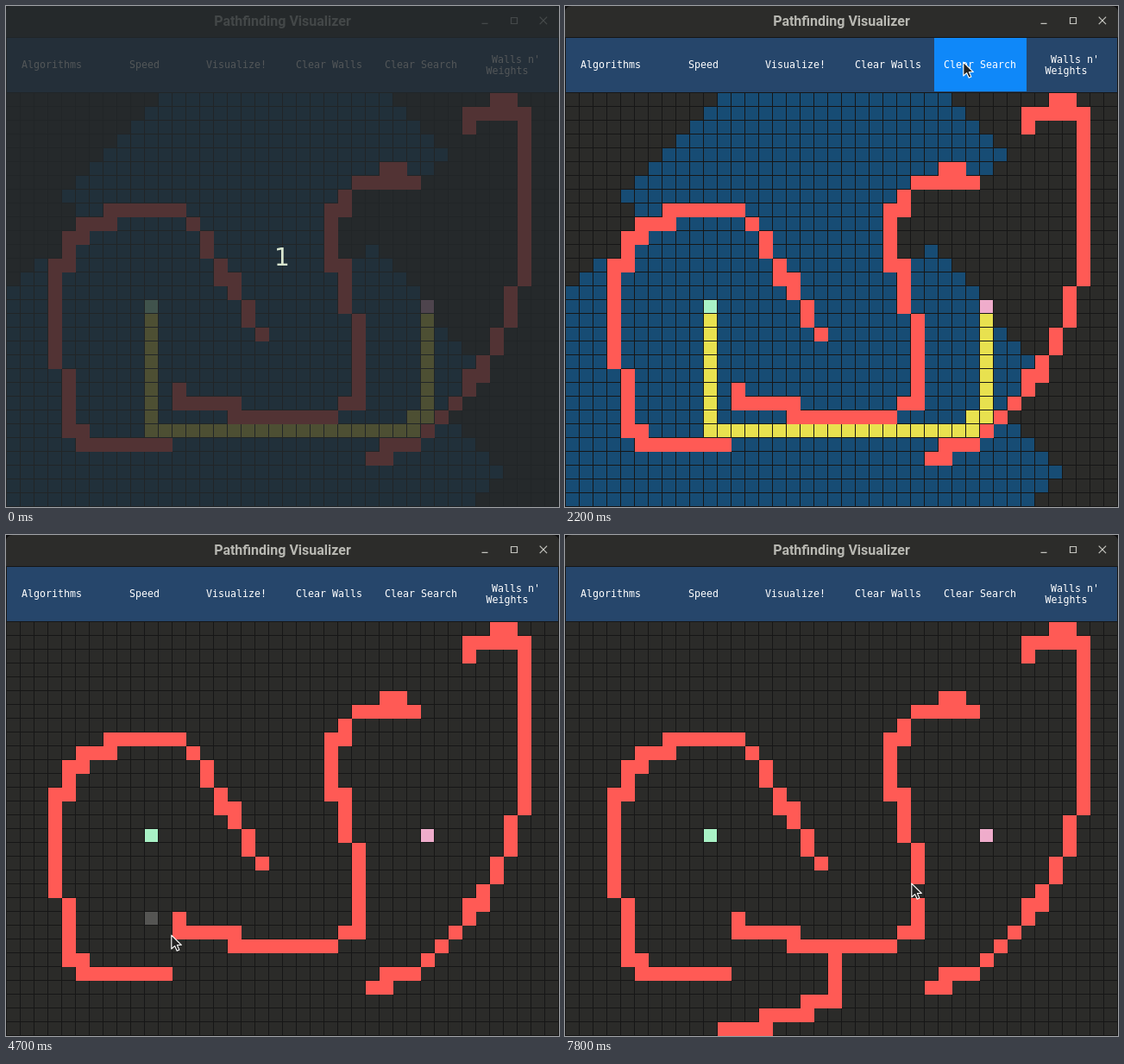
These frames come from a looping animation (641x581 px, 8 s). An HTML page with a canvas:

```html
<!DOCTYPE html>
<html lang="en">
<head>
<meta charset="utf-8">
<title>Pathfinding Visualizer</title>
<style>
  html, body { margin: 0; width: 641px; height: 581px; overflow: hidden; background: #0d0d0d; }
  canvas, svg { position: absolute; left: 0; top: 0; display: block; }
  .title { font: bold 16px Roboto, sans-serif; fill: #b8b8b2; }
  .nav { font: 11.63px "DejaVu Sans Mono", monospace; fill: #fff; }
  .count { font: 28px "DejaVu Sans", sans-serif; fill: #d9e6cf; }
  .icon { fill: none; stroke: #c4c4be; stroke-width: 1.2; }
</style>
</head>
<body>
<canvas id="board" width="641" height="581"></canvas>
<svg width="641" height="581" viewBox="0 0 641 581">
  <path d="M0 36V8Q0 0 8 0H633Q641 0 641 8V36Z" fill="#2c2c2a"/>
  <text class="title" x="320.5" y="23" text-anchor="middle">Pathfinding Visualizer</text>
  <path class="icon" d="M551.5 20.4h7M585.5 13.5h7v7h-7zM618.7 12.7l8.4 8.4m0-8.4l-8.4 8.4"/>
  <g class="nav">
    <text x="18" y="72">Algorithms</text>
    <text x="143" y="72">Speed</text>
    <text x="232" y="72">Visualize!</text>
    <text x="336" y="72">Clear Walls</text>
    <text x="439" y="72">Clear Search</text>
    <text x="563" y="66">Walls n'</text>
    <text x="556.5" y="79">Weights</text>
  </g>
  <path id="cursor" d="M.8 1.2V17L4.6 13.6 7.2 19.3 9.9 18.1 7.4 12.5H12.3Z"
        fill="#242424" stroke="#fff" stroke-width="1.1" stroke-linejoin="round"/>
  <g id="dim">
    <rect width="641" height="581" fill="#24292c" opacity=".79"/>
    <text class="count" x="320" y="301" text-anchor="middle">1</text>
  </g>
</svg>
<script>
const LOOP = 8000, STEP = 100, CELL = 16, TOP = 100, COLS = 40, ROWS = 30;
const ctx = document.getElementById('board').getContext('2d');
const cursor = document.getElementById('cursor');
const dim = document.getElementById('dim');

const color = {
  line: '#161616', empty: '#2b2b29', seen: '#174c74', path: '#e8e14f', wall: '#ff5a55',
  start: '#a9f2c6', end: '#efaccb', hover: '#555553',
  nav: '#26466b', lit: '#4599f8', pressed: '#0f88f9'
};

// Walk the grid from a cell by compass moves
function walk(c, r, moves) {
  const cells = [[c, r]];
  for (const move of moves.split(' ')) {
    const [, dir, n] = move.match(/([NSEW]+)(\d*)/);
    for (let i = 0; i < (n || 1); i++) {
      c += dir.includes('E') - dir.includes('W');
      r += dir.includes('S') - dir.includes('N');
      cells.push([c, r]);
    }
  }
  return cells;
}

const start = [10, 15], end = [30, 15];
const walls = [
  ...walk(18, 17, 'NW N NW N W N NW N NW2 W5 S W2 S W S2 W S7 SE S4 E S E6'),
  ...walk(12, 21, 'S E4 S E7 NE E N6 NW N3 W N4 E N NE E4 NW W'),
  ...walk(36, 0, 'W SW2 N E4 S12 SW S2 SW S SW S W S SW4 W2 S W')
];
const path = walk(10, 16, 'S8 E19 N E N7');
const drawn = walk(11, 29, 'E3 N E3 N E2 N3');
const seen = search();

// Breadth-first search that stops part way through its last ring
function search() {
  const key = (c, r) => r * COLS + c;
  const blocked = new Set(walls.map(([c, r]) => key(c, r)));
  const dist = new Map([[key(...start), 0]]);
  const queue = [start], reach = path.length + 1;
  for (const [c, r] of queue) {
    const d = dist.get(key(c, r)) + 1;
    if (d > reach) continue;
    for (const [x, y] of [[c, r - 1], [c + 1, r], [c, r + 1], [c - 1, r]]) {
      const k = key(x, y);
      if (x < 0 || y < 0 || x >= COLS || y >= ROWS || blocked.has(k) || dist.has(k)) continue;
      dist.set(k, d);
      queue.push([x, y]);
    }
  }
  return queue.filter(([c, r]) => dist.get(key(c, r)) < reach || (c > 2 && r < 15));
}

// Pointer route: tenths of a second, x, y
const route = `7 352 -22,10 394 38,15 461 64,30 461 64,31 440 60,33 440 60,35 398 72,37 288 192,
  38 291 206,39 291 206,41 255 250,43 170 390,44 145 421,46 146 422,47 191 463,48 212 492,
  50 214 528,52 200 558,55 184 571,56 194 571,59 245 562,63 312 525,64 313 511,66 314 502,
  70 322 462,72 345 440,73 384 412,74 400 405,75 401 403`
  .split(',').map(k => k.trim().split(' ').map(Number));

function pointer(t) {
  const s = t / 100, i = route.findIndex(k => k[0] >= s);
  if (i < 0) return route[route.length - 1].slice(1);
  if (i < 1) return route[0].slice(1);
  const [s0, x0, y0] = route[i - 1], [s1, x1, y1] = route[i];
  const p = (s - s0) / (s1 - s0);
  return [x0 + (x1 - x0) * p, y0 + (y1 - y0) * p];
}

function square([c, r], fill, size = 15, inset = 1) {
  ctx.fillStyle = fill;
  ctx.fillRect(c * CELL + inset, TOP + r * CELL + inset, size, size);
}

function grow(cell, age) {
  const size = 6 + 10 * Math.min(1, age / 150);
  square(cell, color.wall, size, 1 + (CELL - size) / 2);
}

function draw(t) {
  ctx.fillStyle = color.line;
  ctx.fillRect(0, 36, 641, 545);
  ctx.fillStyle = color.nav;
  ctx.fillRect(1, 37, 639, 63);

  // The page reacts to the pointer slightly late
  const [lx, ly] = pointer(t - 50);
  const hx = lx + 1, hy = ly + 2;
  if (t >= 800 && hy >= 37 && hy < TOP) {
    ctx.fillStyle = t === 2200 ? color.pressed : color.lit;
    ctx.fillRect(Math.floor(hx / 107) * 107, 37, 107, 62);
  }

  for (let r = 0; r < ROWS; r++)
    for (let c = 0; c < COLS; c++) square([c, r], color.empty);

  if (t < 2300) {
    seen.forEach(cell => square(cell, color.seen));
    path.forEach(cell => square(cell, color.path));
  }

  const drawing = t >= 5500 && t < 6800;
  if (t >= 3600 && t < 7800 && hy > TOP && !drawing)
    square([hx - 1, hy - TOP - 1].map(v => Math.floor(v / CELL)), color.hover);

  for (const cell of walls) {
    const erased = t >= 7800 && cell[0] === 25 && cell[1] === 19;
    if (!erased) square(cell, color.wall, CELL);
  }
  drawn.forEach((cell, i) => {
    const age = t - 5570 - 80 * i;
    if (age >= 0) grow(cell, age);
  });
  square(start, color.start);
  square(end, color.end);

  const [x, y] = pointer(t).map(Math.round);
  cursor.setAttribute('transform', `translate(${x} ${y})`);
  cursor.style.display = t >= 800 ? '' : 'none';
  dim.style.display = t < 100 ? '' : 'none';
}

const begin = performance.now();
let last = -1;
function tick() {
  const t = Math.floor((performance.now() - begin) % LOOP / STEP) * STEP;
  if (t !== last) draw(last = t);
  requestAnimationFrame(tick);
}
tick();
</script>
</body>
</html>
```
